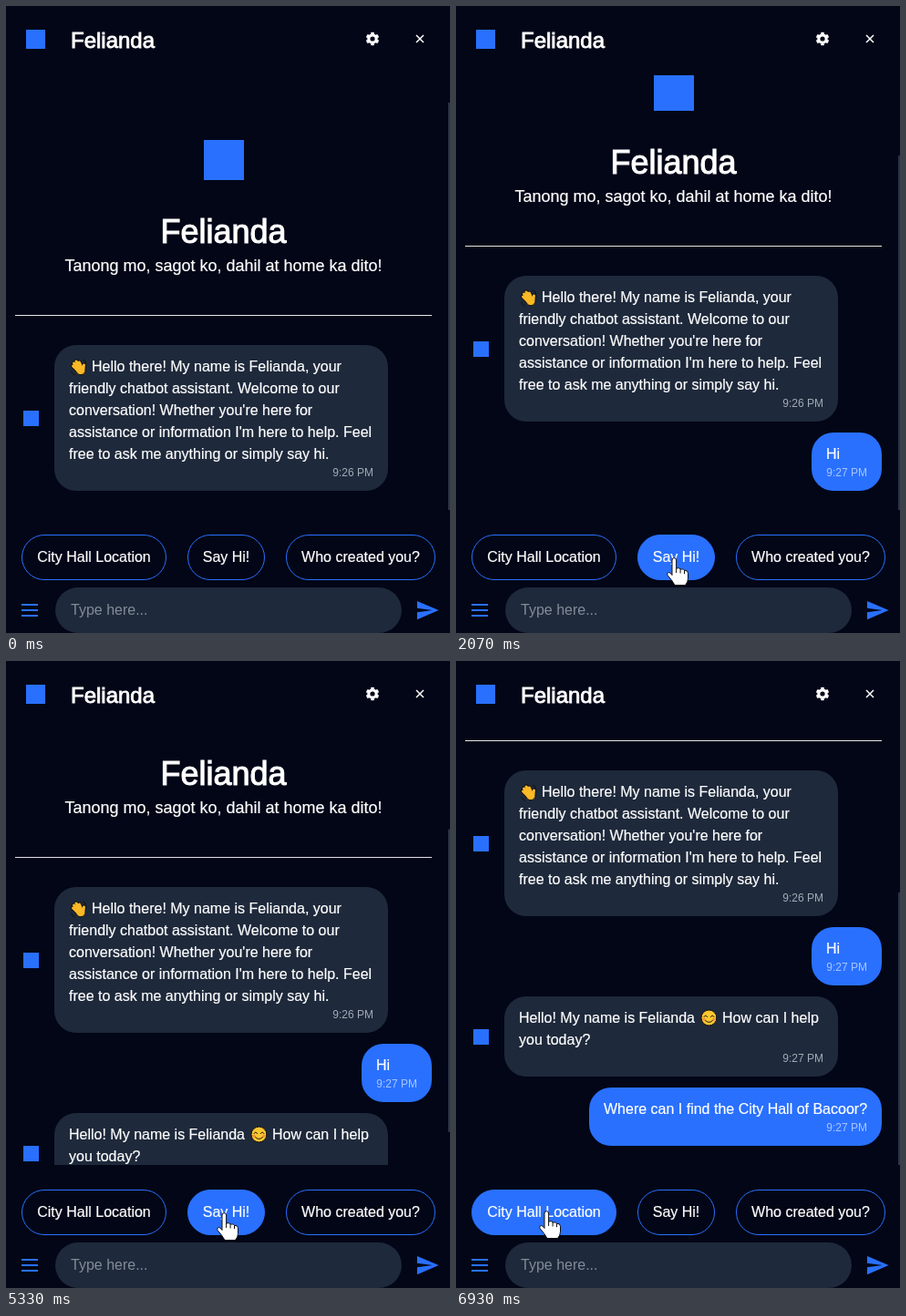
Recreate the animation shown at these times as an HTML page. Size 487 px wide and 688 px high, loop 8000 ms.

```html
<!DOCTYPE html>
<html lang="en">
<head>
<meta charset="utf-8">
<title>Chat assistant</title>
<style>
  html, body { margin: 0; width: 100%; height: 100%; overflow: hidden; background: #020617; }
  svg { display: block; }
  text { font: 16px "Liberation Sans", Arial, sans-serif; fill: #fff; stroke: #fff; stroke-width: .2; white-space: pre; }
  .mid { text-anchor: middle; }
  .end { text-anchor: end; }
  text.name { font-size: 24px; stroke-width: .85; }
  text.title { font-size: 36px; stroke-width: 1.1; }
  text.sub { font-size: 18px; }
  text.time { font-size: 12px; fill: #a3aab5; stroke: none; }
  .mine text.time { fill: #a9c6ff; }
  text.hint { fill: #848b96; stroke: none; }
  .logo, .mine rect { fill: #2970ff; }
  .bubble { fill: #1e293b; }
  .btn rect { fill: #2970ff; fill-opacity: 0; stroke: #2970ff; }
</style>
</head>
<body>
<svg width="487" height="688" viewBox="0 0 487 688">
  <defs>
    <clipPath id="view"><rect y="76" width="487" height="477"/></clipPath>
    <path id="fingers" d="M-1 4L-6-1M1 2L-5-4M3 1L-2.500-6M4 2L1-5M5 4L6-2M2 4L3 5"/>
  </defs>

  <g clip-path="url(#view)">
    <g id="list">
      <rect class="logo" x="217" y="147" width="44" height="44"/>
      <text class="title mid" x="238.500" y="260">Felianda</text>
      <text class="sub mid" x="238.500" y="291">Tanong mo, sagot ko, dahil at home ka dito!</text>
      <path d="M10 339.500H467" stroke="#e5e7eb"/>

      <rect class="logo" x="19" y="444" width="17" height="17"/>
      <rect class="bubble" x="53" y="372" width="366" height="160" rx="24"/>
      <g transform="translate(79.500 396)" fill="none" stroke-linecap="round">
        <use href="#fingers" stroke="#111" stroke-width="5"/>
        <circle cx="2.500" cy="3.500" r="5.200" fill="#fbb827" stroke="#111"/>
        <use href="#fingers" stroke="#fbb827" stroke-width="3"/>
        <path d="M-8 5q1 3 4 4M5-8q3 1 3 4" stroke="#111"/>
      </g>
      <text x="94" y="401">Hello there! My name is Felianda, your</text>
      <text x="69" y="425">friendly chatbot assistant. Welcome to our</text>
      <text x="69" y="449">conversation! Whether you're here for</text>
      <text x="69" y="473">assistance or information I'm here to help. Feel</text>
      <text x="69" y="497">free to ask me anything or simply say hi.</text>
      <text class="time end" x="403" y="516">9:26 PM</text>

      <g id="hi" class="mine">
        <rect x="390" y="544" width="77" height="64" rx="24"/>
        <text x="406" y="573">Hi</text>
        <text class="time end" x="451" y="592">9:27 PM</text>
      </g>

      <g id="typing">
        <rect class="logo" x="19" y="628.500" width="17" height="17"/>
        <g id="dots" fill="#334155">
          <circle cx="65" r="4"/><circle cx="77" r="4"/><circle cx="89" r="4"/>
        </g>
      </g>

      <g id="reply">
        <rect class="logo" x="19" y="656" width="17" height="17"/>
        <rect class="bubble" x="53" y="620" width="366" height="88" rx="24"/>
        <text x="69" y="649">Hello! My name is Felianda</text>
        <g transform="translate(277.500 643.500)" fill="none" stroke="#111" stroke-linecap="round">
          <circle r="8.500" fill="#fcc630"/>
          <path d="M-5.500-1q1.800-3 3.600 0M1.900-1q1.800-3 3.600 0M-4 3q4 4 8 0"/>
          <path d="M-6 1.800h1M5 1.800h1" stroke="#f08a3c" stroke-width="2.500"/>
        </g>
        <text x="292" y="649">How can I help</text>
        <text x="69" y="673">you today?</text>
        <text class="time end" x="403" y="692">9:27 PM</text>
      </g>

      <g id="ask" class="mine">
        <rect x="146" y="720" width="321" height="64" rx="24"/>
        <text x="162" y="749">Where can I find the City Hall of Bacoor?</text>
        <text class="time end" x="451" y="768">9:27 PM</text>
      </g>
    </g>
  </g>
  <rect id="thumb" x="485" width="2" fill="#2b3447"/>

  <rect class="logo" x="22" y="26" width="21" height="21"/>
  <text class="name" x="71" y="45.500">Felianda</text>
  <g fill="none" stroke="#fff">
    <circle cx="402" cy="36" r="4.200" stroke-width="3.200"/>
    <circle cx="402" cy="36" r="6.100" stroke-width="2.400" pathLength="12" stroke-dasharray="1.100 .9" stroke-dashoffset="-.45"/>
    <path d="M450 32l8 8M458 32l-8 8" stroke-width="1.500"/>
  </g>

  <g class="btn">
    <rect id="city" x="17.500" y="580.500" width="158" height="49" rx="24.500"/>
    <rect id="say" x="199.500" y="580.500" width="84" height="49" rx="24.500"/>
    <rect x="307.500" y="580.500" width="163" height="49" rx="24.500"/>
    <text class="mid" x="96.500" y="610">City Hall Location</text>
    <text class="mid" x="241.500" y="610">Say Hi!</text>
    <text class="mid" x="389" y="610">Who created you?</text>
  </g>
  <path d="M17 657h18M17 663h18M17 669h18" stroke="#2970ff" stroke-width="2"/>
  <rect class="bubble" x="54" y="638" width="380" height="50" rx="25"/>
  <text class="hint" x="71" y="668">Type here...</text>
  <path d="M2 21L23 12 2 3V10l15 2-15 2z" fill="#2970ff" transform="translate(448.700 649.500) scale(1.125)"/>

  <g id="cursor" fill="#fff" stroke="#111" stroke-linejoin="round">
    <path id="arrow" d="M.5.5V23l5-5 3.500 8 3.700-1.600-3.500-7.800H15.500z"/>
    <g id="hand">
      <path d="M-2 2a2.300 2.300 0 0 1 4.600 0v9q4-1 4.500 1q4-.6 4.400 1.200q4 0 4 3v6q0 4-3 7.300H1q-2-4-8-11q-1-3 1.500-3q2 .4 3.500 3z"/>
      <path d="M2.600 11v5M7.100 12v4.500M11.500 13.200v4" fill="none"/>
    </g>
  </g>
</svg>
<script>
const LOOP = 8000;
const el = id => document.getElementById(id);
const ramp = (t, a, b) => Math.min(1, Math.max(0, (t - a) / (b - a)));
const ease = p => p < .5 ? 2 * p * p : 1 - 2 * (1 - p) ** 2;
const show = (id, on) => el(id).style.display = on ? '' : 'none';

// Each growth of the list: start, end of the smooth scroll, added height
const steps = [[1760, 2070, 76], [3510, 3800, 47], [5310, 5530, 53], [6640, 6930, 76]];

// Pointer: time, x, y
const track = [
  [0, 390, 700], [530, 390, 700], [600, 384, 682], [670, 368, 680], [730, 366, 700],
  [800, 362, 700], [870, 359, 677], [930, 357, 700], [1140, 345, 700], [1200, 332, 680],
  [1330, 298, 652], [1470, 269, 629], [1600, 248, 612], [1700, 239, 606],
  [6070, 239, 606], [6130, 230, 606], [6400, 112, 603], [6470, 102, 603],
  [6640, 102, 603], [6870, 99, 604], [LOOP, 99, 604]
];

function pointer(t) {
  const i = track.findIndex(k => k[0] > t);
  const [a, b] = [track[i - 1], track[i]];
  const p = ramp(t, a[0], b[0]);
  return [1, 2].map(n => a[n] + (b[n] - a[n]) * p);
}

function draw(t) {
  let scroll = 0, height = 509;
  for (const [a, b, h] of steps) {
    scroll += h * ease(ramp(t, a, b));
    if (t >= a) height += h;
  }
  el('list').setAttribute('transform', `translate(0 ${-scroll})`);
  el('thumb').setAttribute('y', 76 + (32 + scroll) / height * 477);
  el('thumb').setAttribute('height', 477 * 477 / height);

  show('hi', t >= 1760);
  show('typing', t >= 3510 && t < 5310);
  show('reply', t >= 5310);
  show('ask', t >= 6640);
  [...el('dots').children].forEach((dot, i) =>
    dot.setAttribute('cy', 637 + Math.sin((t - 4600) / 930 * 2 * Math.PI - i * .8)));

  el('say').style.fillOpacity = ramp(t, 1540, 1770) - ramp(t, 6200, 6430);
  el('city').style.fillOpacity = ramp(t, 6255, 6485);

  const [x, y] = pointer(t);
  const over = y < 626 && (x < 176 || x > 199);
  el('cursor').setAttribute('transform', `translate(${x} ${y})`);
  show('hand', over);
  show('arrow', !over);
}

const start = performance.now();
function tick() {
  draw((performance.now() - start) % LOOP);
  requestAnimationFrame(tick);
}
tick();
</script>
</body>
</html>
```
